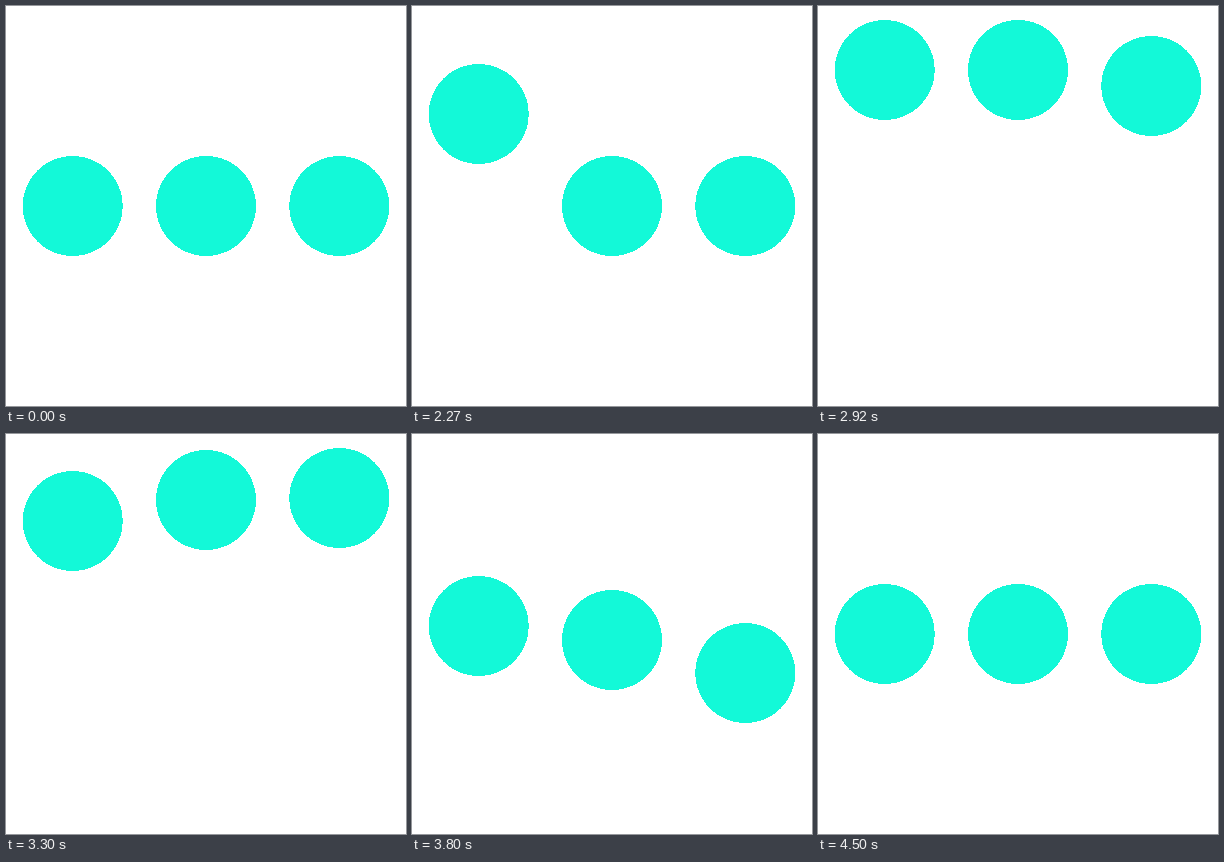
Animation, 400 px wide and 400 px high, one loop 4.52 s. Source, as an HTML page:

```html
<!DOCTYPE html>
<html lang="en">
<head>
<meta charset="utf-8">
<title>Three dots</title>
<style>
  html, body { margin: 0; width: 100%; height: 100%; overflow: hidden; background: #fff; }
  svg { display: block; width: 100%; height: 100%; }
</style>
</head>
<body>
<svg viewBox="0 0 400 400" fill="#13f9d8" shape-rendering="crispEdges">
  <circle cx="66.667" cy="200" r="50"/>
  <circle cx="200" cy="200" r="50"/>
  <circle cx="333.333" cy="200" r="50"/>
</svg>
<script>
const LOOP = 4520, HOLD = 2000, STEP = 25, REST = 200;
const dots = [...document.querySelectorAll("circle")];
const riseLag = [0, 290, 580];
const fallLag = [0, 101, 220];

// Cubic bezier easing from (x1, 0) to (x2, 1), solved by bisection.
function ease(x1, x2) {
  return x => {
    let lo = 0, hi = 1;
    for (let i = 0; i < 30; i++) {
      const u = (lo + hi) / 2, v = 1 - u;
      if (3 * v * v * u * x1 + 3 * v * u * u * x2 + u * u * u < x) lo = u;
      else hi = u;
    }
    return lo * lo * (3 - 2 * lo);
  };
}

const rise = [{ start: 0, end: 520, from: 0, to: -136, ease: ease(0.6, 0.3) }];
const fall = [
  { start: 1134, end: 1538, from: -136, to: 42, ease: ease(0.83, 0.52) },
  { start: 1538, end: 1958, from: 42, to: -13, ease: ease(0.28, 0.2) },
  { start: 1958, end: 2280, from: -13, to: 0, ease: ease(0.4, 0.5) }
];

function along(track, t) {
  let y = track[0].from;
  for (const s of track) {
    if (t <= s.start) break;
    y = t >= s.end ? s.to
      : s.from + (s.to - s.from) * s.ease((t - s.start) / (s.end - s.start));
  }
  return y;
}

function offset(i, t) {
  const f = t - fallLag[i];
  return f > fall[0].start ? along(fall, f) : along(rise, t - riseLag[i]);
}

function draw(ms) {
  const tick = Math.floor((ms % LOOP) / 10) * 10;
  const t = Math.max(0, Math.floor((tick - HOLD + 5) / STEP) * STEP);
  dots.forEach((dot, i) => dot.setAttribute("cy", REST + Math.floor(offset(i, t))));
}

const begin = performance.now();
function frame() {
  draw(performance.now() - begin);
  requestAnimationFrame(frame);
}
frame();
</script>
</body>
</html>
```
